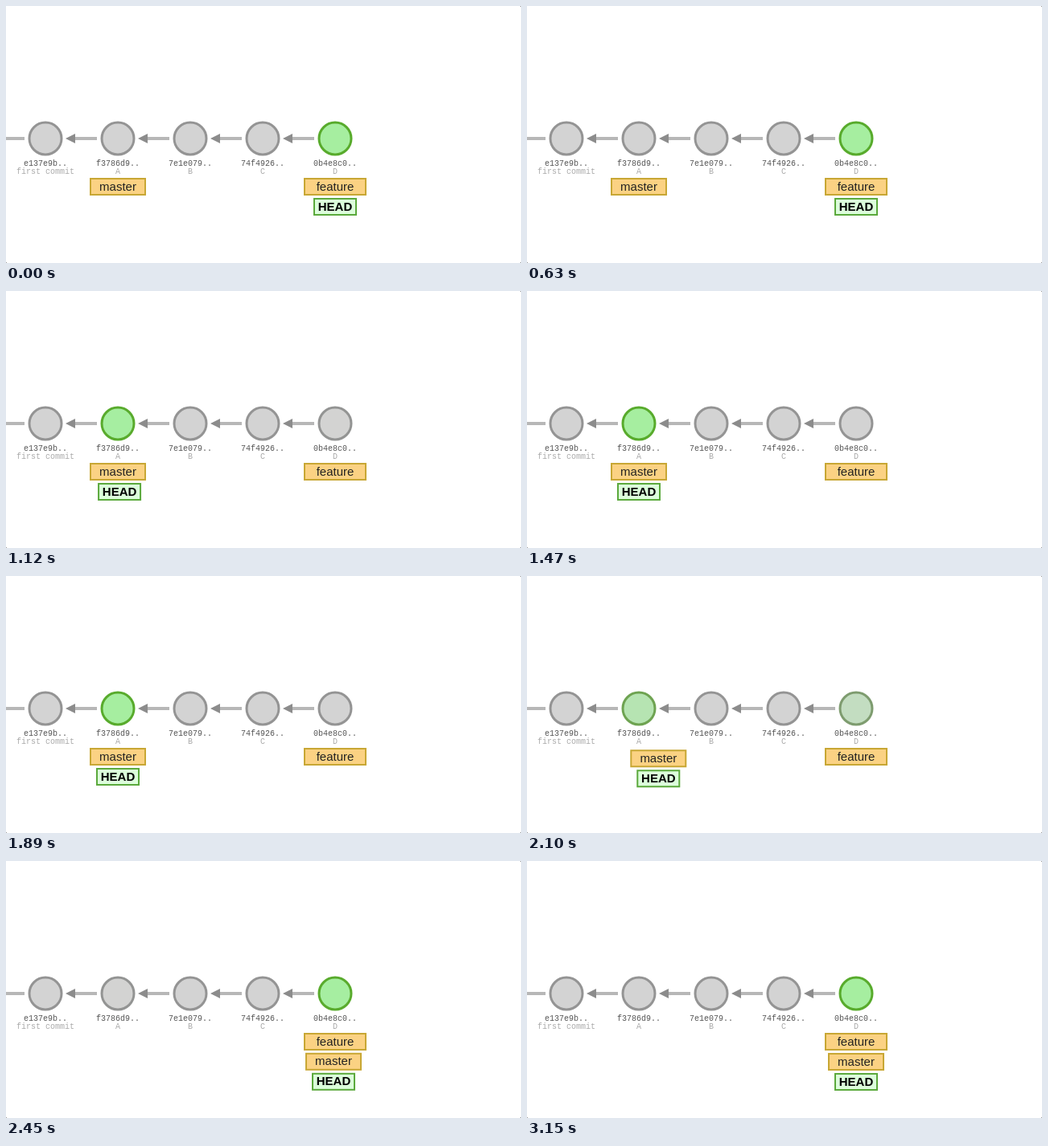
Write an HTML page with a canvas that moves like this. It is 640 by 320 pixels and loops after 3220 ms.

```html
<!DOCTYPE html>
<html lang="en">
<head>
<meta charset="utf-8">
<title>Commit graph</title>
<style>
html, body { margin: 0; width: 100%; height: 100%; overflow: hidden; background: #fff; }
canvas { display: block; width: 640px; height: 320px; }
</style>
</head>
<body>
<canvas id="stage" width="640" height="320"></canvas>
<script>
const ctx = document.getElementById('stage').getContext('2d');
const LOOP = 3220, STEP = 70;
const SANS = 'Arial, "Liberation Sans", sans-serif';
const MONO = '"Liberation Mono", "Courier New", monospace';
const commits = [
  ['e137e9b..', 'first commit'],
  ['f3786d9..', 'A'],
  ['7e1e079..', 'B'],
  ['74f4926..', 'C'],
  ['0b4e8c0..', 'D']
];
const commitX = i => 49 + 90 * i;
const MASTER_X = commitX(1), FEATURE_X = commitX(4);
const checkout = { start: 697, length: 483 };
const merge = { start: 1934, length: 588 };

const GREY = { fill: [211, 211, 211], line: [148, 148, 148] };
const GREEN = { fill: [166, 238, 160], line: [88, 171, 44] };
const YELLOW = { fill: '#fbd283', line: '#c8a734' };
const MINT = { fill: '#dcfedb', line: '#5ba93c' };

const clamp = v => Math.min(1, Math.max(0, v));
const lerp = (a, b, p) => a + (b - a) * p;
const mix = (a, b, p) => `rgb(${a.map((v, i) => Math.round(lerp(v, b[i], p))).join()})`;
const phase = (t, move) => clamp((t - move.start) / move.length);
const cubicInOut = u => u < 0.5 ? 4 * u ** 3 : 1 - 4 * (1 - u) ** 3;

// cubic-bezier(.25, .1, .25, 1)
function ease(x) {
  let lo = 0, hi = 1, s = 0.5;
  for (let i = 0; i < 24; i++) {
    s = (lo + hi) / 2;
    const bx = 0.75 * s * (1 - s) ** 2 + 0.75 * s * s * (1 - s) + s ** 3;
    if (bx < x) lo = s; else hi = s;
  }
  return 0.3 * s * (1 - s) ** 2 + 3 * s * s * (1 - s) + s ** 3;
}
const tint = u => ease(clamp((u - 0.07) / 0.93));

function label(text, x, y, font, color) {
  ctx.font = font;
  ctx.fillStyle = color;
  ctx.fillText(text, x, y);
}

function arrow(tip) {
  ctx.fillStyle = '#b7b7b7';
  ctx.fillRect(tip + 10, 163, 29, 4);
  ctx.fillStyle = '#8c8c8c';
  ctx.beginPath();
  ctx.moveTo(tip, 165);
  ctx.lineTo(tip + 12, 159);
  ctx.lineTo(tip + 12, 171);
  ctx.fill();
}

function commit(i, green) {
  const x = commitX(i), [id, message] = commits[i];
  ctx.beginPath();
  ctx.arc(x, 165, 20, 0, Math.PI * 2);
  ctx.fillStyle = mix(GREY.fill, GREEN.fill, green);
  ctx.fill();
  ctx.lineWidth = 3;
  ctx.strokeStyle = mix(GREY.line, GREEN.line, green);
  ctx.stroke();
  label(id, x, 199, '10px ' + MONO, '#555');
  label(message, x, 209, '10px ' + MONO, '#aaa');
}

function tag(text, x, y, width, style, weight) {
  ctx.fillStyle = style.fill;
  ctx.strokeStyle = style.line;
  ctx.lineWidth = 2;
  ctx.fillRect(x - width / 2, y, width, 20);
  ctx.strokeRect(x - width / 2, y, width, 20);
  label(text, x, y + 14.5, `${weight} 15px ${SANS}`, weight === 'bold' ? '#000' : '#222');
}

function draw(t) {
  ctx.fillStyle = '#fff';
  ctx.fillRect(0, 0, 640, 320);
  ctx.fillStyle = '#999';
  for (const [x, y] of [[639, 0], [0, 319], [639, 319]]) ctx.fillRect(x, y, 1, 1);
  ctx.textAlign = 'center';

  const u1 = phase(t, checkout), u2 = phase(t, merge);
  const out = cubicInOut(u1), back = cubicInOut(u2);
  const onMaster = u2 > 0 ? 1 - tint(u2) : tint(u1);

  ctx.fillStyle = '#b7b7b7';
  ctx.fillRect(0, 163, 23, 4);
  for (let i = 0; i < 4; i++) arrow(commitX(i) + 25);
  commits.forEach((c, i) => commit(i, i === 1 ? onMaster : i === 4 ? 1 - onMaster : 0));

  const masterX = lerp(MASTER_X, FEATURE_X, back);
  const headX = u2 > 0 ? masterX : lerp(FEATURE_X, MASTER_X, out);
  tag('feature', FEATURE_X, 215, 76, YELLOW, 'normal');
  tag('master', masterX, 215 + 25 * back, 68, YELLOW, 'normal');
  tag('HEAD', headX, 240 + 25 * back, 52, MINT, 'bold');
}

const begin = performance.now();
function tick() {
  const t = (performance.now() - begin) % LOOP;
  draw(Math.floor(t / STEP) * STEP);
  requestAnimationFrame(tick);
}
tick();
</script>
</body>
</html>
```
